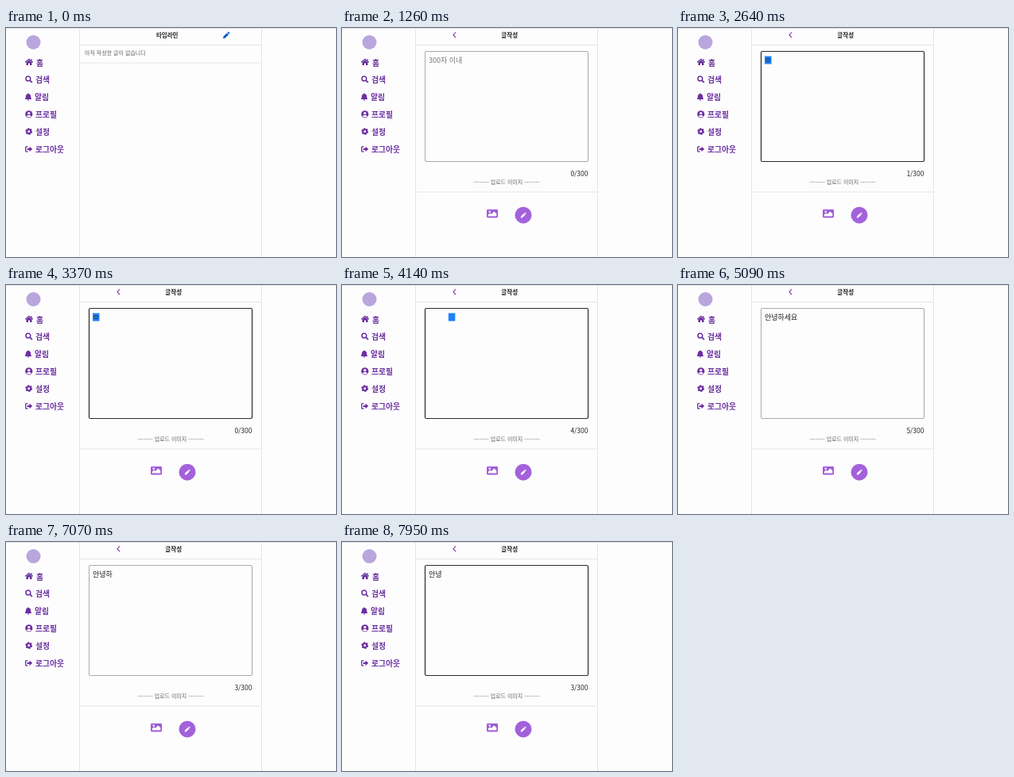
Write an HTML page that moves like this. It is 415 by 289 pixels and loops after 8 s.

```html
<!DOCTYPE html>
<html lang="ko">
<head>
<meta charset="utf-8">
<style>
  html, body { margin: 0; width: 100%; height: 100%; overflow: hidden; background: #fefdfe; }
  svg { display: block; font: 7px "Noto Sans CJK KR", "Noto Sans CJK", "Noto Sans", sans-serif; }
  .nav { fill: #6a2fa0; color: #6a2fa0; }
  .nav text { font-size: 9.8px; font-weight: 700; }
  .title { font-size: 7.5px; font-weight: 700; fill: #222; text-anchor: middle; }
  .lines { stroke: #e5e3e9; fill: none; }
  .stroke { fill: none; stroke: currentColor; }
  .input { font-size: 9px; }
</style>
</head>
<body>
<svg width="415" height="289" viewBox="0 0 415 289">
  <defs>
    <g id="pencil">
      <path d="M-4 4l.5-2.6L.9-3 3-.9-1.4 3.5z"/>
      <path d="M1.4-3.5l.7-.6q.6-.5 1.2 0l.8.8q.5.6 0 1.2l-.6.7z"/>
    </g>
  </defs>

  <path class="lines" d="M0 .5H415M92.5 0V289M321.5 0V289M93 21.5H321"/>
  <circle cx="34.5" cy="18" r="9" fill="#b9a6dc"/>

  <g class="nav">
    <g transform="translate(29 43)">
      <path class="stroke" stroke-width="1.2" d="M-4.8.2L0-3.8 4.8.2"/>
      <path d="M-3.5.3L0-2.5 3.5.3V4H1V1.4H-1V4H-3.5zM2.4-3.8h1.3v2.4l-1.3-1z"/>
    </g>
    <g class="stroke" transform="translate(28.5 64.5)">
      <circle cx="-.6" cy="-.6" r="2.9" stroke-width="1.5"/>
      <path stroke-width="1.8" d="M1.6 1.6L4.4 4.4"/>
    </g>
    <path transform="translate(28 87)" d="M-.6-4.6H.6V-4Q3.1-3.4 3.1-.7 3.1 1.3 4 2.2V3H-4V2.2Q-3.1 1.3-3.1-.7-3.1-3.4-.6-4zM-1.2 3.5H1.2Q1 4.7 0 4.7T-1.2 3.5"/>
    <g transform="translate(28.8 108.8)">
      <circle r="4.6"/>
      <circle cy="-1.2" r="1.7" fill="#fefdfe"/>
      <path fill="#fefdfe" d="M-3 2.7Q-2.5 1.1-1 1.1H1Q2.5 1.1 3 2.7 0 5-3 2.7"/>
    </g>
    <g class="stroke" transform="translate(28.7 130.6)">
      <circle r="2.5" stroke-width="2"/>
      <circle r="3.7" stroke-width="1.5" stroke-dasharray="2 1.875"/>
    </g>
    <g transform="translate(28.5 152.8)">
      <path class="stroke" stroke-width="1.3" d="M-1.2-3.2H-2.8Q-3.8-3.2-3.8-2.2V2.2Q-3.8 3.2-2.8 3.2H-1.2"/>
      <path d="M-1.8-1.1H1V-3.4L4.7 0 1 3.4V1.1H-1.8z"/>
    </g>
    <text x="38" y="47.6">홈</text>
    <text x="37" y="69.4">검색</text>
    <text x="36" y="91.2">알림</text>
    <text x="37" y="113">프로필</text>
    <text x="37" y="134.9">설정</text>
    <text x="37" y="156.8">로그아웃</text>
  </g>

  <g id="timeline">
    <text class="title" x="202.7" y="12.3">타임라인</text>
    <use href="#pencil" transform="translate(277 9.2)" fill="#1560c4"/>
    <text x="99" y="34.4" fill="#666">아직 작성한 글이 없습니다</text>
    <path class="lines" d="M93 44H321"/>
  </g>

  <g id="editor">
    <path d="M143 5.4L139.9 8.7 143 12" fill="none" stroke="#7b3fb5" stroke-width="1.1"/>
    <text class="title" x="210.7" y="12.3">글작성</text>
    <rect id="box" x="104.5" y="29.5" width="205" height="139" rx="1.5" fill="none"/>
    <rect id="mark" y="35.5" width="8.5" height="10" fill="#1e82fa"/>
    <text id="field" class="input" x="109" y="43.8"></text>
    <path id="caret" d="M0 36V45.5" stroke="#333" stroke-width=".7"/>
    <text id="count" x="309.3" y="187.2" font-size="8.4" text-anchor="end" fill="#222"></text>
    <text x="207" y="197.4" text-anchor="middle" fill="#666">-------- 업로드 이미지 --------</text>
    <path class="lines" d="M93 207H321"/>
    <rect x="182" y="229" width="14" height="10.4" rx="1.3" fill="#9f5cd8"/>
    <path d="M183.8 237.6V235.6L186.3 233.4 187.8 234.9 191.3 231.5 194.3 234.5V237.6z" fill="#fefdfe"/>
    <circle cx="185.7" cy="231.8" r="1.2" fill="#fefdfe"/>
    <circle cx="228" cy="236.2" r="10.5" fill="#a361dc"/>
    <use href="#pencil" transform="translate(228 236.4) scale(.82)" fill="#fff"/>
  </g>
</svg>
<script>
const LOOP = 8000, EDITOR_AT = 1260, LEFT = 109, GLYPH = 8.28;
const $ = id => document.getElementById(id);

// time, text, counter, flags: F focused, C caret, M composing mark, H text hidden
const states = [
  [1260, '', 0, ''],
  [1840, '', 0, 'FC'],
  [2200, '', 0, 'F'],
  [2500, 'ㅇ', 0, 'FM'],
  [2640, 'ㅇ', 1, 'FM'],
  [2860, '', 1, 'FC'],
  [2930, '', 0, 'FC'],
  [3370, 'ㅇ', 0, 'FM'],
  [3440, '아', 1, 'FM'],
  [3510, '안', 1, 'FM'],
  [3580, '안ㄴ', 1, 'FM'],
  [3650, '안녀', 2, 'FM'],
  [3720, '안녕', 2, 'FM'],
  [3790, '안녕ㅎ', 2, 'FM'],
  [3860, '안녕하', 3, 'FM'],
  [3930, '안녕핫', 3, 'FM'],
  [4000, '안녕하세', 3, 'FM'],
  [4070, '안녕하세', 4, 'FM'],
  [4140, '안녕하세', 4, 'FMH'],
  [4210, '안녕하세ㅇ', 4, 'FM'],
  [4280, '안녕하세요', 5, 'FM'],
  [5020, '안녕하세요', 5, ''],
  [5830, '안녕하세요', 5, 'FC'],
  [6200, '안녕하세', 5, 'FC'],
  [6270, '안녕하세', 4, 'FC'],
  [6340, '안녕하', 4, 'FC'],
  [6480, '안녕하', 3, 'FC'],
  [6620, '안녕하', 3, 'F'],
  [7000, '안녕하', 3, ''],
  [7510, '안녕하', 3, 'FC'],
  [7880, '안녕', 3, 'F']
];

const show = (id, on) => $(id).style.display = on ? '' : 'none';

function draw(time) {
  const editing = time >= EDITOR_AT;
  show('timeline', !editing);
  show('editor', editing);
  if (!editing) return;

  const [, text, count, flags] = states.findLast(s => s[0] <= time);
  const has = flag => flags.includes(flag);
  const end = LEFT + GLYPH * text.length;

  $('box').setAttribute('stroke', has('F') ? '#2b2b2e' : '#aaa8b2');
  $('box').setAttribute('stroke-width', has('F') ? 1.2 : 1);
  $('field').textContent = text || '300자 이내';
  $('field').setAttribute('fill', text ? '#1c1c1e' : '#777');
  $('count').textContent = count + '/300';
  $('mark').setAttribute('x', end - GLYPH);
  $('caret').setAttribute('transform', `translate(${end + .2})`);
  show('field', !has('H'));
  show('mark', has('M'));
  show('caret', has('C'));
}

const start = performance.now();
function tick() {
  draw((performance.now() - start) % LOOP);
  requestAnimationFrame(tick);
}
tick();
</script>
</body>
</html>
```
